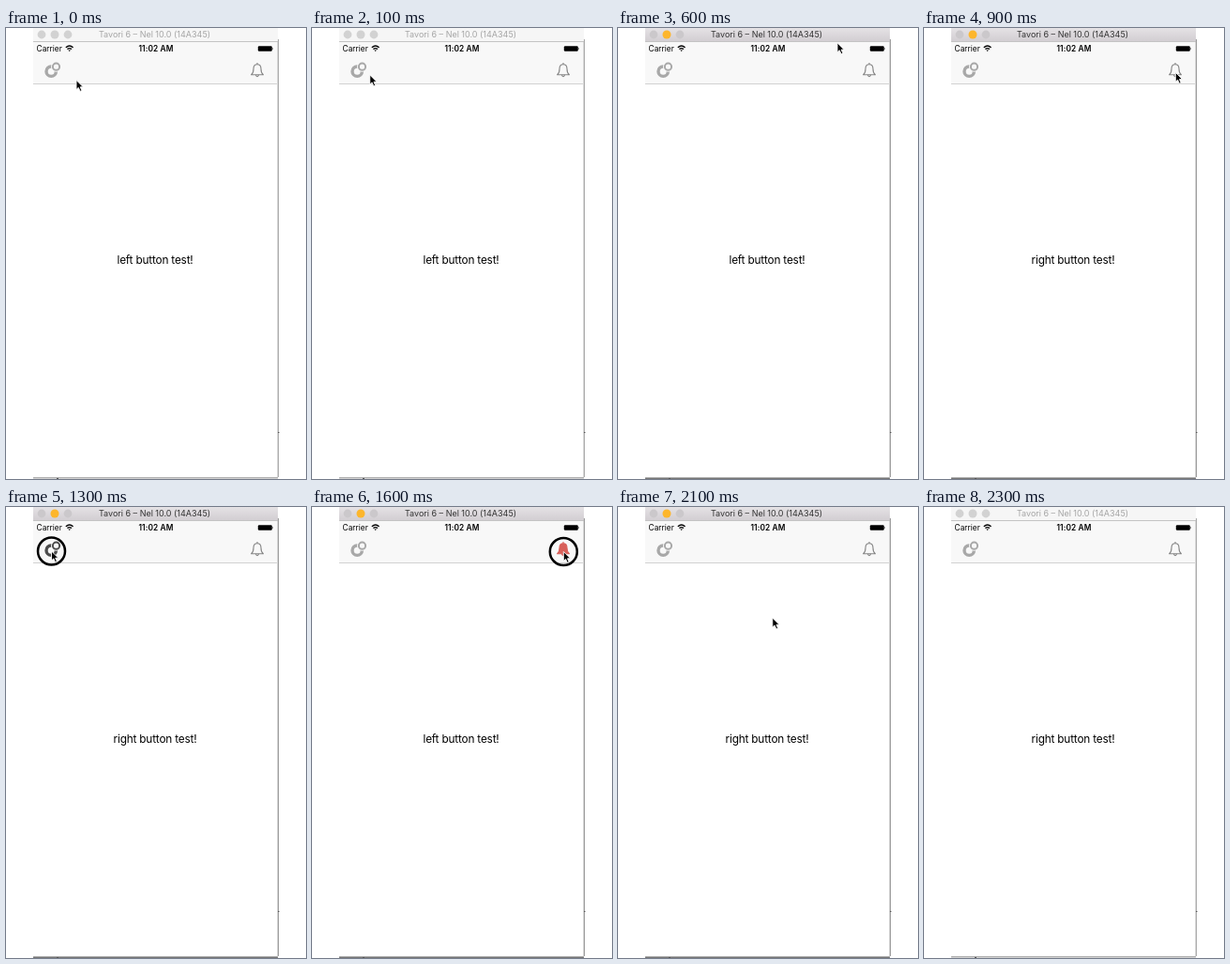
Animation of 320x480 px, one loop 2400 ms. Source, as an HTML page:

```html
<!DOCTYPE html>
<html lang="en">
<head>
<meta charset="utf-8">
<title>Button test</title>
<style>
html, body { margin: 0; width: 100%; height: 100%; overflow: hidden; background: #fff; }
svg { display: block; width: 320px; height: 480px; }
text { font-family: Inter, Roboto, sans-serif; text-anchor: middle; }
#title { font-size: 9px; fill: #a5a5a5; }
.status { font-size: 8.3px; }
#clock { font-weight: 600; letter-spacing: .12px; }
#label { font-size: 11.8px; letter-spacing: -.18px; }
#gear { color: #a8a8a8; }
#gear.down { color: #4c4c4c; }
#bell { fill: none; stroke: #858585; }
#bell.down { fill: #d8605a; stroke: #d8605a; }
#bar { fill: #f6f6f6; }
#lights { fill: #d2d2d2; }
#side { stroke: #a8a8a8; }
#base { stroke: #d0d0d0; }
.active #bar { fill: url(#chrome); }
.active #lights { fill: #cbc8cb; }
.active #title { fill: #333; }
.active #minimize { fill: #fdb62c; }
.active #side { stroke: #999; }
.active #base { stroke: #777; }
</style>
</head>
<body>
<svg id="stage" viewBox="0 0 320 480">
  <defs>
    <linearGradient id="chrome" x2="0" y2="1">
      <stop stop-color="#e5e2e5"/><stop offset="1" stop-color="#d2ced2"/>
    </linearGradient>
  </defs>

  <!-- window edges -->
  <path d="M289.5 14V478" stroke="#dedede"/>
  <path id="side" d="M290.5 12V478"/>
  <path d="M29 478.5H290" stroke="#b0b0b0"/>
  <path id="base" d="M29 479.5H290"/>
  <path d="M290 430.5h1.5M54 479.5h2" stroke="#555"/>

  <!-- title bar -->
  <path id="bar" d="M29 14V0H290V14Z"/>
  <path d="M29 14.5H290" stroke="#c4c4c4"/>
  <g id="lights">
    <circle cx="38" cy="7" r="4.4"/>
    <circle id="minimize" cx="52" cy="7" r="4.5"/>
    <circle cx="66" cy="7" r="4.4"/>
  </g>
  <text id="title" x="158.5" y="10.4">Tavori 6 – Nel 10.0 (14A345)</text>

  <!-- status and navigation bars -->
  <path d="M29 15H289V59H29Z" fill="#f8f8f8"/>
  <path d="M29 59.5H289" stroke="#d2d2d2"/>
  <text class="status" x="46.2" y="25">Carrier</text>
  <text class="status" id="clock" x="159.9" y="25">11:02 AM</text>
  <g fill="none" stroke="#000" stroke-width="1.3">
    <path d="M63.8 20.7Q67.7 17.3 71.6 20.7M65.4 22.6Q67.7 20.7 70 22.6"/>
    <path d="M66.4 23.6h2.6L67.7 25Z" fill="#000" stroke="none"/>
  </g>
  <rect x="268.8" y="19.2" width="15" height="5.6" rx="1.2"/>
  <path d="M284.3 20.8q1.4 1.2 0 2.4Z"/>

  <g id="gear" fill="none" stroke="currentColor">
    <circle cx="48.2" cy="46.2" r="5.2" stroke-width="3.4"/>
    <circle cx="53.5" cy="41.2" r="5.5" fill="#f8f8f8" stroke="none"/>
    <circle cx="53.5" cy="41.2" r="3.6" stroke-width="2"/>
  </g>
  <g id="bell" stroke-width="1.1" stroke-linejoin="round">
    <path d="M261.6 49.8Q264 48 264 43.5C264 40.4 265.6 38.7 268 38.7S272 40.4 272 43.5Q272 48 274.4 49.8Z"/>
    <path d="M268 38.7V37M266.4 50.1Q268 53.4 269.6 50.1"/>
  </g>

  <text id="label" x="159" y="250.7"></text>

  <g id="pointer">
    <circle id="ring" r="14.5" fill="none" stroke="#000" stroke-width="2.5"/>
    <path d="M0 0V10L2.3 7.9L4.1 11.9L5.9 11.1L4.2 7.3H7.3Z" stroke="#fff" stroke-width=".9"/>
  </g>
</svg>
<script>
const STEP = 100, LOOP = 2400, PRESS = 200, LIFT = 44;

// Where the pointer rests, from when until when, and which button it presses on arrival.
const stops = [
  { from: 0, to: 0, x: 75, y: 55.5 },
  { from: 200, to: 300, x: 48.5, y: 44.5, side: "left" },
  { from: 700, to: 900, x: 268.3, y: 47.3, side: "right" },
  { from: 1200, to: 1300, x: 48.5, y: 47, side: "left" },
  { from: 1600, to: 1700, x: 268.3, y: 47.5, side: "right" },
  { from: 1800, to: 1900, x: 151.5, y: 256 },
  { from: 2300, to: LOOP, x: 178, y: -20 }
];
const clicks = stops.filter(s => s.side);
const el = id => document.getElementById(id);
const ease = p => p * p * (3 - 2 * p);

function pointerAt(t) {
  const a = stops.findLast(s => s.from <= t);
  if (t <= a.to) return a;
  const b = stops[stops.indexOf(a) + 1];
  const p = (t - a.to) / (b.from - a.to), e = ease(p);
  // trips between the two buttons arc over the top
  const lift = a.side && b.side ? LIFT * Math.sin(Math.PI * p) : 0;
  return { x: a.x + (b.x - a.x) * e, y: a.y + (b.y - a.y) * e - lift };
}

function draw(t) {
  const { x, y } = pointerAt(t);
  const pressed = clicks.find(c => t >= c.from && t < c.from + PRESS)?.side;
  const released = clicks.findLast(c => t >= c.from + PRESS)?.side ?? "left";

  el("stage").classList.toggle("active", t >= clicks[0].from && t < stops.at(-1).from);
  el("gear").classList.toggle("down", pressed === "left");
  el("bell").classList.toggle("down", pressed === "right");
  el("label").textContent = `${released} button test!`;
  el("pointer").setAttribute("transform", `translate(${x} ${y})`);
  el("ring").style.display = pressed ? "" : "none";
}

const start = performance.now();
function tick() {
  const t = (performance.now() - start) % LOOP;
  draw(Math.floor(t / STEP) * STEP);
  requestAnimationFrame(tick);
}
tick();
</script>
</body>
</html>
```
